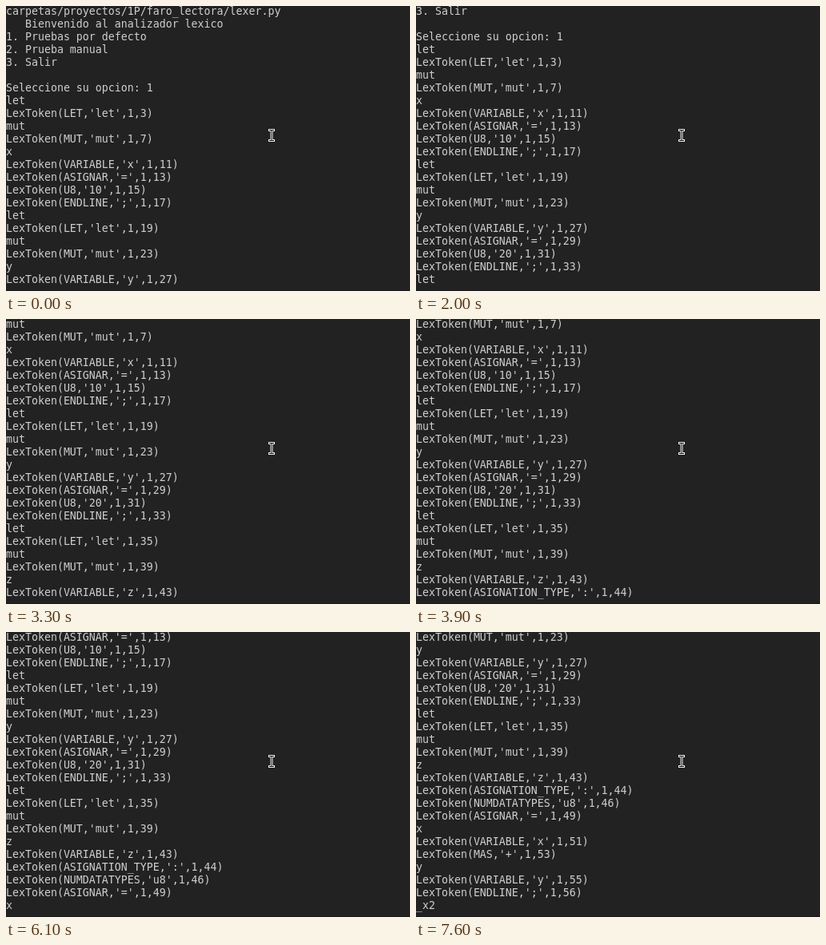
An HTML page that plays this animation: 505 px wide and 357 px high, repeating every 8 s.

```html
<!DOCTYPE html>
<html lang="es">
<head>
<meta charset="utf-8">
<title>Analizador lexico</title>
<style>
  html, body { margin: 0; width: 100%; height: 100%; overflow: hidden; background: #222; }
  svg { display: block; }
  .screen { overflow: hidden; }
  text { font: 13.288px "DejaVu Sans Mono", monospace; fill: #cfcfcf; }
  #log { animation: scroll 8s step-end infinite; }
  /* one printed line = 16px */
  @keyframes scroll {
    0% { transform: translateY(0); }
    10% { transform: translateY(-16px); }
    17.5% { transform: translateY(-32px); }
    23.75% { transform: translateY(-48px); }
    25% { transform: translateY(-64px); }
    32.5% { transform: translateY(-96px); }
    38.75% { transform: translateY(-128px); }
    41.25% { transform: translateY(-144px); }
    48.75% { transform: translateY(-160px); }
    58.75% { transform: translateY(-176px); }
    60% { transform: translateY(-192px); }
    76.25% { transform: translateY(-208px); }
    78.75% { transform: translateY(-224px); }
    85% { transform: translateY(-240px); }
    88.75% { transform: translateY(-256px); }
    93.75% { transform: translateY(-272px); }
    95%, 100% { transform: translateY(-304px); }
  }
</style>
</head>
<body>
<svg width="505" height="357" viewBox="0 0 505 357">
  <rect width="505" height="357" fill="#222"/>
  <rect y="356" width="505" height="1" fill="#1a1a1a"/>
  <svg class="screen" width="505" height="352"><g id="log"></g></svg>
  <g fill="none">
    <path d="M328 155.5h8M332 155v14M328 168.5h8" stroke="#f4f4f4" stroke-width="3"/>
    <path d="M329 155.5h6M332 155v14M329 168.5h6" stroke="#111" stroke-width="1"/>
  </g>
</svg>
<script>
  const LINE = 16, BASELINE = 11;
  const menu = [
    "carpetas/proyectos/1P/faro_lectora/lexer.py",
    "   Bienvenido al analizador lexico",
    "1. Pruebas por defecto",
    "2. Prueba manual",
    "3. Salir",
    "",
    "Seleccione su opcion: 1"
  ];
  const tokens = `LET let 3|MUT mut 7|VARIABLE x 11|ASIGNAR = 13|U8 10 15|ENDLINE ; 17
    |LET let 19|MUT mut 23|VARIABLE y 27|ASIGNAR = 29|U8 20 31|ENDLINE ; 33
    |LET let 35|MUT mut 39|VARIABLE z 43|ASIGNATION_TYPE : 44|NUMDATATYPES u8 46
    |ASIGNAR = 49|VARIABLE x 51|MAS + 53|VARIABLE y 55|ENDLINE ; 56`;

  // keywords and identifiers are echoed before their token
  const echoed = ["LET", "MUT", "VARIABLE"];
  const output = tokens.split("|").flatMap(entry => {
    const [type, value, pos] = entry.trim().split(" ");
    const line = `LexToken(${type},'${value}',1,${pos})`;
    return echoed.includes(type) ? [value, line] : [line];
  });

  const log = document.getElementById("log");
  [...menu, ...output, "_x2"].forEach((line, i) => {
    const text = document.createElementNS("http://www.w3.org/2000/svg", "text");
    text.setAttribute("y", BASELINE + i * LINE);
    text.textContent = line.replace(/ /g, "\u00a0");
    log.append(text);
  });
</script>
</body>
</html>
```
